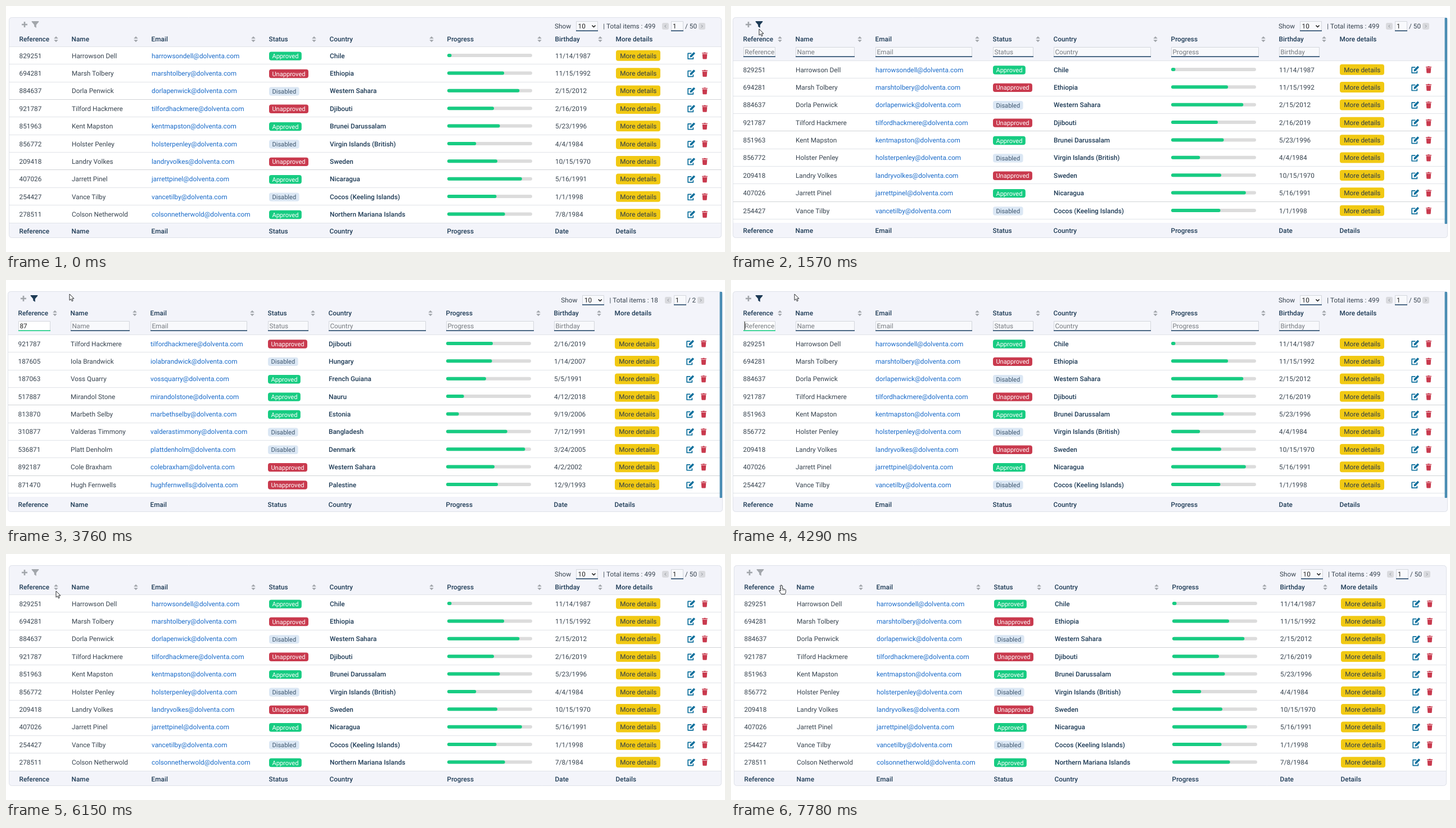
An HTML page with a canvas for the animation above (8000 ms loop, 1279x438 px).

```html
<!DOCTYPE html>
<html lang="en">
<head>
<meta charset="utf-8">
<title>Data table with filters</title>
<style>
html, body { margin: 0; width: 100%; height: 100%; overflow: hidden; background: #fff; }
canvas { display: block; }
</style>
</head>
<body>
<canvas id="stage" width="1279" height="438"></canvas>
<script>
const ctx = document.getElementById('stage').getContext('2d');
const LOOP = 8000, PITCH = 31.38;
const NAVY = '#1d3a55', INK = '#37434f', GREEN = '#17cc82', RED = '#c93a4e';
const PANEL = '#f3f4fa', EDGE = '#dfe2e9', GREY = '#a2a6ab';
const BODY = '11.8px Roboto, sans-serif';
const BOLD = '500 11.8px Roboto, sans-serif';
const SMALL = '11.1px Roboto, sans-serif';

// reference | name | status | country | progress % | birthday
const ROWS = `829251|Harrowson Dell|A|Chile|5|11/14/1987
694281|Marsh Tolbery|U|Ethiopia|67|11/15/1992
884637|Dorla Penwick|D|Western Sahara|85|2/15/2012
921787|Tilford Hackmere|U|Djibouti|55|2/16/2019
851963|Kent Mapston|A|Brunei Darussalam|62|5/23/1996
856772|Holster Penley|D|Virgin Islands (British)|34|4/4/1984
209418|Landry Volkes|U|Sweden|59|10/15/1970
407026|Jarrett Pinel|A|Nicaragua|88|5/16/1991
254427|Vance Tilby|D|Cocos (Keeling Islands)|58|1/1/1998
278511|Colson Netherwold|A|Northern Mariana Islands|68|7/8/1984
323658|Hillman Tenford|U|Macau|34|8/23/1976
187605|Iola Brandwick|D|Hungary|54|1/14/2007
187063|Voss Quarry|A|French Guiana|47|5/5/1991
517887|Mirandol Stone|A|Nauru|21|4/12/2018
813870|Marbeth Selby|A|Estonia|15|9/19/2006
310877|Valderas Timmony|D|Bangladesh|72|7/12/1991
536871|Platt Denholm|D|Denmark|93|3/24/2005
892187|Cole Braxham|U|Western Sahara|57|4/2/2002
871470|Hugh Fernwells|U|Palestine|61|12/9/1993`.split('\n').map(line => {
  const [ref, name, status, country, pct, date] = line.split('|');
  const email = name.toLowerCase().replace(' ', '') + '@dolventa.com';
  return { ref, name, email, status, country, pct: +pct, date };
});

const BADGES = {
  A: ['Approved', GREEN, '#fff'],
  U: ['Unapproved', RED, '#fff'],
  D: ['Disabled', '#dbe7f4', '#3d566e']
};
const TOTALS = { '': [499, 50], '8': [218, 22], '87': [18, 2] };

// label, left edge, sort icon centre, filter width
const COLS = [
  ['Reference', 24, 89, 57], ['Name', 117, 231, 105], ['Email', 259, 440, 172],
  ['Status', 468, 548, 72], ['Country', 576, 757, 173], ['Progress', 785, 949, 156],
  ['Birthday', 977, 1057, 72], ['More details', 1085, 0, 0]
];

// pointer legs: start, end, steps, target
const LEGS = [
  [460, 1140, 11, 50, 33], [1570, 1570, 1, 50, 41], [1620, 1830, 4, 50, 81],
  [2300, 2570, 4, 113, 25], [4640, 4840, 4, 120, 36], [4910, 5400, 8, 54, 34],
  [5540, 6150, 10, 89, 66], [6420, 6420, 1, 89, 63], [7780, 7780, 1, 90, 58]
];
const CLICKS = [[1420, 1570], [2030, 2100], [5470, 5610], [6620, 6770], [7430, 7570], [7640, 7780]];
const CARETS = [[2030, 2570], [3030, 3760], [4290, 4820], [5350, 5470]];

const ARROW = new Path2D('M0 0V11.2L2.6 8.8L4.3 12.8L6.2 12L4.5 8.1H8Z');
const HAND = new Path2D('M-1.6 8V-.6Q-1.6-2 0-2T1.6-.6V4Q3.2 3 4 4.6Q5.4 4 6 5.4Q7.4 5 7.4 6.6V9.5Q7.2 11.5 6 13.5H-.5Q-2.5 10.8-4 8Q-4.6 6.4-3 6.6L-1.6 8Z');
const BEAM = new Path2D('M-2.5-6.5H-.5L0-6L.5-6.5H2.5M0-6V6M-2.5 6.5H-.5L0 6L.5 6.5H2.5');
const FUNNEL = new Path2D('M-6.3-6H6.3V-4.8L1.8.4V6L-1.8 3.6V.4L-6.3-4.8Z');
const BIN = new Path2D('M-5-5.2H-2L-1.4-6H1.4L2-5.2H5V-3.8H-5ZM-4.3-3H4.3L3.7 5.2Q3.6 6.2 2.6 6.2H-2.6Q-3.6 6.2-3.7 5.2Z');
const PENCIL = new Path2D('M-2.4 3.2L-2-.1L4-6Q4.6-6.5 5.2-6L6.5-4.7Q7-4.1 6.5-3.5L.6 2.6Z');
const SHEET = new Path2D('M.5-4.4H-5.6V5.5H3.6V2');

const within = (t, spans) => spans.some(([a, b]) => t >= a && t < b);
const ease = p => p * p * (3 - 2 * p);

function text(str, x, mid, color = INK, font = BODY) {
  ctx.font = font;
  ctx.fillStyle = color;
  ctx.fillText(str, x, mid + 4.2);
}

function box(x, y, w, h, r, color) {
  ctx.fillStyle = color;
  ctx.beginPath();
  ctx.roundRect(x, y, w, h, r);
  ctx.fill();
}

function rect(x, y, w, h, color) {
  ctx.fillStyle = color;
  ctx.fillRect(x, y, w, h);
}

function at(x, y, draw) {
  ctx.save();
  ctx.translate(x, y);
  draw();
  ctx.restore();
}

function fillPath(path, x, y, color) {
  at(x, y, () => { ctx.fillStyle = color; ctx.fill(path); });
}

function strokePath(path, x, y, color, width) {
  at(x, y, () => { ctx.strokeStyle = color; ctx.lineWidth = width; ctx.stroke(path); });
}

function triangle(x, y, dir, color) {
  ctx.fillStyle = color;
  ctx.beginPath();
  ctx.moveTo(x - 3.8, y);
  ctx.lineTo(x + 3.8, y);
  ctx.lineTo(x, y + 4 * dir);
  ctx.fill();
}

function field(x, y, w, h, focused) {
  rect(x, y, w, h, focused ? '#fff' : '#f8f9fc');
  ctx.strokeStyle = '#d3d6dc';
  ctx.lineWidth = 1;
  ctx.strokeRect(x + .5, y + .5, w - 1, h - 1);
  rect(x, y + h - 1.6, w, 1.6, focused ? GREEN : '#24486a');
}

function chevron(x, y, dx, dy, color, width) {
  ctx.strokeStyle = color;
  ctx.lineWidth = width;
  ctx.beginPath();
  if (dy) {
    ctx.moveTo(x - 3, y - 1.5); ctx.lineTo(x, y + 1.5); ctx.lineTo(x + 3, y - 1.5);
  } else {
    ctx.moveTo(x - dx, y - 2.4); ctx.lineTo(x + dx, y); ctx.lineTo(x - dx, y + 2.4);
  }
  ctx.stroke();
}

function pager(dx, [items, pages]) {
  ctx.font = BODY;
  const near = ctx.measureText('50').width - ctx.measureText(String(pages)).width;
  const far = near + ctx.measureText('499').width - ctx.measureText(String(items)).width;
  const a = dx + far, b = dx + near;
  text('Show', 976 + a, 36);
  field(Math.round(1014 + a), 27, 39, 18);
  text('10', 1017.6 + a, 36, '#222');
  chevron(1045.5 + a, 36, 0, 1, '#222', 1.7);
  text('|', 1062.3 + a, 36);
  text('Total items : ' + items, 1068 + a, 36);
  const prev = Math.round(1167 + b), next = 1232 + dx;
  box(prev, 30, 12, 12, 3, '#d9dade');
  chevron(prev + 6, 36, -1.2, 0, '#8d9298', 1);
  field(Math.round(1183 + b), 27, 22, 18);
  text('1', 1186 + b, 36, '#222');
  text('/ ' + pages, 1208 + b, 36);
  box(next, 30, 12, 12, 3, '#d9dade');
  chevron(next + 6, 36, 1.2, 0, '#8d9298', 1);
}

function drawRow(row, dx, mid) {
  text(row.ref, 23.6 + dx, mid);
  text(row.name, 117 + dx, mid);
  text(row.email, 259 + dx, mid, '#1a6bc9');

  const [label, back, fore] = BADGES[row.status];
  ctx.font = SMALL;
  box(468 + dx, mid - 7, ctx.measureText(label).width + 10.8, 15.4, 4, back);
  text(label, 473.4 + dx, mid + .6, fore, SMALL);

  text(row.country, 576 + dx, mid, NAVY, BOLD);
  box(785 + dx, mid - 3.4, 151, 6, 3, '#dcdcdc');
  box(785 + dx, mid - 3.4, 1.51 * row.pct, 6, 3, GREEN);
  text(row.date, 977 + dx, mid);
  box(1085 + dx, mid - 9.6, 79, 19, 4, '#f1c913');
  text('More details', 1092.3 + dx, mid, '#2f3d49');
  strokePath(SHEET, 1218.8 + dx, mid + .3, '#0c6f9c', 1.7);
  fillPath(PENCIL, 1219 + dx, mid, '#0c6f9c');
  fillPath(BIN, 1243 + dx, mid, RED);
}

function pointer(t) {
  if (t < LEGS[0][0]) return null;
  let x = 975, y = 419;
  for (const [a, b, n, tx, ty] of LEGS) {
    if (t < a) break;
    const k = b > a ? Math.floor((t - a) / (b - a) * (n - 1) + .01) : n - 1;
    const first = a === 460;
    const p = ease(Math.min(1, first ? k / (n - 1) : (k + 1) / n));
    x += (tx - x) * p;
    y += (ty - y) * p;
  }
  return { x, y };
}

function drawPointer(pos, kind) {
  if (kind === 'beam') return strokePath(BEAM, pos.x, pos.y, '#222', 1);
  const path = kind === 'hand' ? HAND : ARROW;
  fillPath(path, pos.x, pos.y, '#fff');
  strokePath(path, pos.x, pos.y, '#26292d', 1);
  if (kind === 'hand') {
    for (const gap of [1.7, 4]) rect(pos.x + gap, pos.y + 4.5, .7, 3, '#26292d');
  }
}

function visibleRows(query, order) {
  const list = ROWS.filter(r => r.ref.includes(query));
  if (order) list.sort((a, b) => order * (a.ref - b.ref));
  return list;
}

function draw(t) {
  const open = t >= 1490 && t < 5540;
  const focused = t >= 2030 && t < 5470;
  const query = t >= 3230 && t < 4020 ? '87' : t >= 3030 && t < 4090 ? '8' : '';
  const order = t < 6770 || t >= 7780 ? 0 : t < 7500 ? 1 : -1;
  const pos = pointer(t);
  const onFunnel = pos && Math.abs(pos.x - 52) < 8 && pos.y > 26 && pos.y < 38;
  const onField = pos && open && pos.x > 22 && pos.x < 79 && pos.y > 72 && pos.y < 92;
  const kind = onFunnel || t >= 6420 ? 'hand' : onField ? 'beam' : 'arrow';
  const dx = open ? -2 : 0;
  const headEnd = open ? 97 : 72, footTop = open ? 386 : 387;
  const left = 5 + dx, width = 1268 - 2 * dx;

  rect(0, 0, 1279, 438, '#fff');

  // panel
  ctx.save();
  ctx.beginPath();
  ctx.roundRect(left, 20, width, 393, 5);
  ctx.clip();
  rect(left, 20, width, 393, PANEL);
  rect(left, headEnd, width, footTop - headEnd, '#fff');
  for (let k = 0; k < 11; k++) {
    const y = Math.floor(headEnd + .3 + PITCH * k);
    const strong = open ? k && k % 4 === 0 : k % 4 === 3;
    if (y <= footTop) rect(left, y, width, 1, strong ? '#d0d3d6' : '#e0e3e8');
  }
  ctx.restore();
  ctx.strokeStyle = EDGE;
  ctx.lineWidth = 1;
  ctx.beginPath();
  ctx.roundRect(left + .5, 20.5, width - 1, 392, 5);
  ctx.stroke();
  if (open) box(1269.6, 21, 4.4, 367, 1, '#4a8db3');

  // toolbar
  rect(28 + dx, 31.7, 10, 2.6, GREY);
  rect(31.7 + dx, 28, 2.6, 10, GREY);
  fillPath(FUNNEL, 52 + dx, 33, open || onFunnel ? NAVY : GREY);
  pager(dx, TOTALS[query]);

  // header, filters and footer
  COLS.forEach(([label, x, icon, w], i) => {
    text(label, x - .4 + dx, 59, NAVY, BOLD);
    const foot = i === 6 ? 'Date' : i === 7 ? 'Details' : label;
    text(foot, x - .4 + dx, open ? 399.6 : 400.4, NAVY, BOLD);
    if (icon) {
      triangle(icon + dx, 58, -1, !i && order > 0 ? NAVY : GREY);
      triangle(icon + dx, 60.3, 1, !i && order < 0 ? NAVY : GREY);
    }
    if (open && w) {
      const active = !i && focused;
      field(x + dx, 73, w, 18, active);
      const typed = i ? '' : query;
      text(typed || label, x + 2.4 + dx, 82, typed ? '#222' : '#777b80');
    }
  });
  if (open && within(t, CARETS)) {
    rect(24 + Math.round(6.6 * query.length), 74, 1, 15, '#111');
  }

  const top = open ? 113.3 : 88.4;
  visibleRows(query, order).slice(0, open ? 9 : 10)
    .forEach((row, k) => drawRow(row, dx, top + PITCH * k));

  if (!pos) return;
  if (within(t, CLICKS)) box(pos.x - 10.5, pos.y - 10, 21, 20, 10, 'rgba(250,230,30,.62)');
  drawPointer(pos, kind);
}

ctx.textRendering = 'geometricPrecision';
ctx.lineJoin = 'round';
function tick() {
  draw(performance.now() % LOOP);
  requestAnimationFrame(tick);
}
tick();
</script>
</body>
</html>
```
